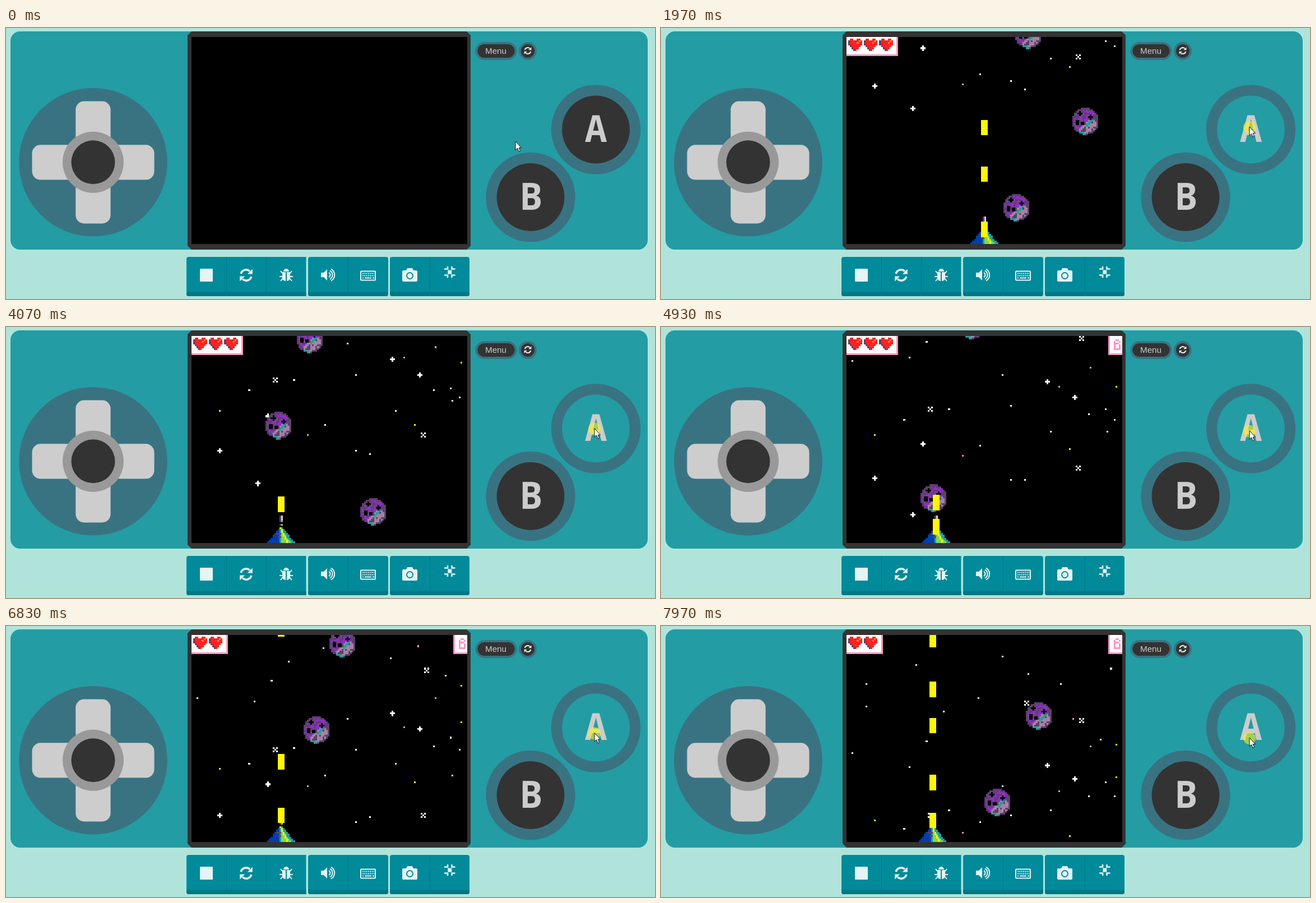
An HTML page with a canvas that plays this animation: 1158 by 483 pixels, repeating every 8 s.

```html
<!DOCTYPE html>
<html lang="en">
<head>
<meta charset="utf-8">
<title>Space shooter</title>
<style>
html, body { margin: 0; width: 100%; height: 100%; overflow: hidden; background: #b0e4db; }
svg, canvas { position: absolute; left: 0; top: 0; }
#game { left: 331px; top: 16px; width: 492px; height: 369px; image-rendering: pixelated; }
</style>
</head>
<body>
<svg width="1158" height="483">
  <defs>
    <g id="half">
      <path d="M-9.3-2.5A9.6 9.6 0 0 1 6.5-7" fill="none" stroke="#e5f4f5" stroke-width="3.6"/>
      <path d="M11.3-11V-2H2.3Z"/>
    </g>
    <g id="refresh"><use href="#half"/><use href="#half" transform="rotate(180)"/></g>
  </defs>
  <rect x="8" y="6" width="1137" height="389" rx="17" fill="#249ca3"/>
  <path d="M331 6H822L829 13V388L822 395H331L324 388V13Z" fill="#333"/>
  <g fill="#397382">
    <circle cx="155.5" cy="239.3" r="132.3"/>
    <circle cx="1052.5" cy="181" r="79.7"/>
    <circle cx="936" cy="301.5" r="79.7"/>
  </g>
  <g fill="#cdcdcd">
    <rect x="124.3" y="130.5" width="62.3" height="218" rx="15"/>
    <rect x="155" y="208.3" width="109.5" height="62.3" rx="15"/>
    <rect id="left" x="46.5" y="208.3" width="109" height="62.3" rx="15"/>
  </g>
  <circle cx="155.5" cy="239.3" r="54.5" fill="#999"/>
  <circle cx="155.5" cy="239.3" r="39" fill="#333"/>
  <circle id="a" cx="1052.5" cy="181" r="60.4" fill="#333"/>
  <circle cx="936" cy="301.5" r="60.4" fill="#333"/>
  <g font-family="Noto Sans Mono, monospace" font-weight="700" font-size="67" fill="#ccc" text-anchor="middle">
    <text x="1052.5" y="203">A</text>
    <text x="936.5" y="324">B</text>
  </g>
  <g fill="#333" stroke="#397382" stroke-width="4">
    <rect x="839.5" y="27" width="70" height="28" rx="14"/>
    <circle cx="931" cy="41" r="14"/>
  </g>
  <text x="874" y="45.5" font-family="Liberation Sans, Arial, sans-serif" font-size="15.2" fill="#ccc" text-anchor="middle">Menu</text>
  <use href="#refresh" transform="translate(931 40.5) scale(.57)" fill="#e5f4f5"/>

  <g fill="#008a9a">
    <path d="M326 408H535.5V478H326a4 4 0 0 1-4-4V412a4 4 0 0 1 4-4Z"/>
    <rect x="539" y="408" width="143" height="70" rx="4"/>
    <rect x="685" y="408" width="142" height="70" rx="4"/>
  </g>
  <g fill="#007786">
    <path d="M322 470.5H535.5V478H326a4 4 0 0 1-4-4Z"/>
    <path d="M539 470.5H682V474a4 4 0 0 1-4 4H543a4 4 0 0 1-4-4Z"/>
    <path d="M685 470.5H827V474a4 4 0 0 1-4 4H689a4 4 0 0 1-4-4Z"/>
    <path d="M393 408h1v70h-1zM464 408h1v70h-1zM610 408h1v70h-1zM756 408h1v70h-1z"/>
  </g>
  <g fill="#e5f4f5">
    <rect x="346" y="429" width="23" height="23" rx="1"/>
    <use href="#refresh" x="428.5" y="440.5"/>
    <g transform="translate(500 440)">
      <path d="M-5-6a5 5 0 0 1 10 0ZM-7-5H-1V11C-5 11-7 8-7 4ZM7-5H1V11C5 11 7 8 7 4Z"/>
      <path d="M-7-3L-10-7M7-3L10-7M-6 3H-12M6 3H12M-6 6L-10 11M6 6L10 11" stroke="#e5f4f5" stroke-width="2"/>
    </g>
    <g transform="translate(574 440)">
      <path d="M-12-4H-7L-1-10V10L-7 4H-12Z"/>
      <path d="M2-4a4.5 4.5 0 0 1 0 8M4-7.5a8.5 8.5 0 0 1 0 15M6-10.5a12 12 0 0 1 0 21" fill="none" stroke="#e5f4f5" stroke-width="2"/>
    </g>
    <g fill="none" stroke="#e5f4f5" stroke-width="2">
      <rect x="633" y="433.5" width="26" height="16" rx="1"/>
      <path d="M636 437.5H657M636 441.5H657" stroke-dasharray="2 1.3"/>
      <path d="M636 445.5h2M640 445.5h12M654 445.5h3"/>
    </g>
    <path d="M709 432h5l2-4h9l2 4h5q2 0 2 2v16q0 2-2 2h-23q-2 0-2-2v-16q0-2 2-2Z"/>
    <circle cx="720.5" cy="441.5" r="5.5" fill="none" stroke="#008a9a" stroke-width="2"/>
    <rect x="788.3" y="431.5" width="7" height="7"/>
    <path d="M788 425v4.5h-6M795.5 425v4.5h6M788 445v-4.5h-6M795.5 445v-4.5h6" fill="none" stroke="#e5f4f5" stroke-width="2.6"/>
  </g>
</svg>
<canvas id="game" width="160" height="120"></canvas>
<svg width="1158" height="483">
  <g id="pointer">
    <circle id="click" r="11" cy="1" fill="#fff01e" fill-opacity=".6"/>
    <path d="M0 0V15.5L3.6 12.3 6 18.3 8.6 17.2 6.2 11.5H10.5Z" fill="#fff" stroke="#111"/>
  </g>
</svg>
<script>
const $ = id => document.getElementById(id);
const ctx = $('game').getContext('2d');
const WHITE = '#fff', RED = '#ff2121', PINK = '#ff93c4', ORANGE = '#ff8135', YELLOW = '#fff609', TEAL = '#249ca3',
  GREEN = '#78dc52', BLUE = '#003fad', PURPLE = '#8e2ec4', MAUVE = '#a4839f', PLUM = '#5c406c', CREAM = '#e5cdc4',
  BLACK = '#000';

const clamp = v => Math.max(0, Math.min(1, v));
const hash = n => { const v = Math.sin(n * 12.9898 + 4) * 43758.5453; return v - Math.floor(v); };

function box(c, color, x, y, w = 1, h = 1) {
  c.fillStyle = color;
  c.fillRect(x, y, w, h);
}

function sprite(paint) {
  const cv = document.createElement('canvas');
  cv.width = cv.height = 16;
  const c = cv.getContext('2d');
  paint((...args) => box(c, ...args));
  return cv;
}

// Dark rim, craters, purple top left, mauve bottom right, teal vein between
const craters = [[5, 3], [11, 5], [3.5, 8], [6.5, 8.5]];
function rock(x, y) {
  const r = Math.hypot(x - 8.2, y - 7.4);
  if (craters.some(([cx, cy]) => Math.hypot(x - cx, y - cy) < 1.3)) return BLACK;
  if (r > 6.7) return y > 13 && x < 9 ? TEAL : PLUM;
  if (y > 6 && Math.abs(x + y - 18.5) < 1 && x > 8) return TEAL;
  if (x + y > 16 && y > 6) return hash(x + 16 * y) < .75 ? MAUVE : PLUM;
  return hash(x + 16 * y) < .6 ? PURPLE : PLUM;
}
const asteroid = sprite(put => {
  for (let y = 0; y < 16; y++)
    for (let x = 0; x < 16; x++)
      if (Math.hypot(x - 8.2, y - 7.4) < 7.8) put(rock(x, y), x, y);
});

// A thin cannon above a hull that widens downwards, lit from the right
const ship = sprite(put => {
  put(PLUM, 7, 0, 1, 6);
  put(CREAM, 8, 0, 1, 3);
  put(MAUVE, 8, 3);
  put(BLACK, 7, 4, 2);
  put(GREEN, 8, 5);
  for (let y = 7; y < 16; y++) {
    const half = Math.round(1 + (y - 7) * .88);
    put(BLUE, 8 - half, y, half);
    put(TEAL, 7, y, half + 1);
    put(GREEN, 8, y, Math.max(0, half - 2));
    put(YELLOW, 8 + ((y - 8) >> 1), y);
  }
  put(PLUM, 5, 10, 3);
  put(PLUM, 6, 12, 2);
});

const heart = sprite(put => {
  put(RED, 1, 0, 2);
  put(RED, 5, 0, 2);
  put(RED, 0, 1, 8, 3);
  for (let i = 1; i < 4; i++) {
    put(RED, i, 3 + i, 8 - 2 * i);
    put(PLUM, i, 3 + i);
  }
  put(PLUM, 0, 1, 1, 3);
  put(ORANGE, 6, 1);
  put(ORANGE, 5, 2);
});

// Large stars: x, birth in ms, speed per second
const pluses = [[16, 550, 18.7], [38, 140, 21.6], [132, 2670, 15.7], [116, 3280, 15.9], [44, 1725, 19.6]];
const crosses = [[48, 2845, 20.2], [134, 1535, 22.5], [136, 4830, 15.6], [104, 6245, 22.8]];
const asteroidX = [90, 130, 97, 42, 60, 64, 79, 103];
const shots = [1580, 1780, 2020, 2827, 2909, 3962, 4795, 4898, 5076, 5283, 5849, 6078, 7160, 7374, 7530, 7773, 7936];

// The picture stalls after each of these, shows one late state, then catches up
const stalls = [80, 2110, 4070, 6080, 7970];
const STEP = 78;
function gameTime(t) {
  const i = stalls.findLastIndex(s => s <= t);
  if (i < 0) return 0;
  let g = stalls[i];
  const held = t - g;
  if (held >= 820) g = stalls[i + 1] - STEP * Math.ceil((stalls[i + 1] - t) / STEP);
  else if (held >= 740) g += 55;
  return g < 2500 ? g + 70 : g;
}

const shipX = g => g > 6900 ? 42 : Math.round(72 - 28 * clamp((g - 3450) / 280));

function drawStars(g) {
  const fall = (birth, speed) => Math.round(speed * (g - birth) / 1000);
  for (let i = 0; i < 36; i++) {
    const birth = 150 + 220 * i, tint = hash(i + 200);
    const color = tint < .75 ? WHITE : tint < .9 ? PINK : YELLOW;
    if (g > birth) box(ctx, color, Math.floor(160 * hash(i)), fall(birth, 14 + 9 * hash(i + 100)));
  }
  for (const [x, birth, speed] of pluses) {
    const y = fall(birth, speed);
    box(ctx, WHITE, x - 1, y, 3, 1);
    box(ctx, WHITE, x, y - 1, 1, 3);
  }
  for (const [x, birth, speed] of crosses) {
    const y = fall(birth, speed);
    for (let d = -1; d <= 1; d++) {
      box(ctx, WHITE, x + d, y + d);
      box(ctx, WHITE, x + d, y - d);
    }
  }
}

function drawDebris(x, y, k) {
  for (let i = 0; i < 256; i++) {
    if (hash(i) < k) continue;
    const px = i % 16, py = i >> 4;
    const lift = hash(i + 300) > .5 ? 20 * k * hash(i + 600) : 0;
    ctx.drawImage(asteroid, px, py, 1, 1, x + px, Math.round(y + py - lift), 1, 1);
  }
}

function drawHud(g) {
  const lives = g < 5150 ? 3 : 2;
  box(ctx, PINK, 0, 0, 9 * lives + 3, 11);
  box(ctx, WHITE, 0, 0, 9 * lives + 2, 10);
  for (let i = 0; i < lives; i++) ctx.drawImage(heart, 1 + 9 * i, 1);
  if (g < 4880) return;
  box(ctx, PINK, 152, 0, 8, 11);
  box(ctx, WHITE, 153, 0, 7, 10);
  box(ctx, PINK, 155, 3, 4, 5);
  box(ctx, PINK, 156, 2, 2);
  box(ctx, WHITE, 156, 3, 2);
  box(ctx, WHITE, 158, 4);
  box(ctx, WHITE, 156, 5, 2, 2);
}

function drawGame(g) {
  box(ctx, BLACK, 0, 0, 160, 120);
  if (!g) return;
  drawStars(g);
  ctx.drawImage(ship, shipX(g), 104);
  asteroidX.forEach((x, i) => {
    const y = Math.round((g - 1000 * i + 120) / 20 - 16);
    if (y < -16 || i === 4 && g > 4880) return;
    if (i === 3 && g > 5150) drawDebris(x, y, (g - 5150) / 600);
    else ctx.drawImage(asteroid, x, y);
  });
  for (const shot of shots)
    if (g >= shot) box(ctx, YELLOW, shipX(shot) + 6, Math.round(107.5 - .135 * (g - shot)), 4, 9);
  drawHud(g);
}

function frame(now) {
  const g = gameTime(now % 8000);
  const pressed = shots.some(shot => g >= shot && g < shot + 120);
  const reach = clamp(g / 1320), drift = clamp((g - 3060) / 4900);
  drawGame(g);
  $('a').setAttribute('fill', pressed ? TEAL : '#333');
  $('click').setAttribute('visibility', pressed ? 'visible' : 'hidden');
  $('left').setAttribute('fill', g > 3450 && g < 3730 ? TEAL : '#cdcdcd');
  $('pointer').setAttribute('transform', `translate(${909 + 141 * reach} ${202 - 26 * reach + 23 * drift})`);
  requestAnimationFrame(frame);
}
requestAnimationFrame(frame);
</script>
</body>
</html>
```
